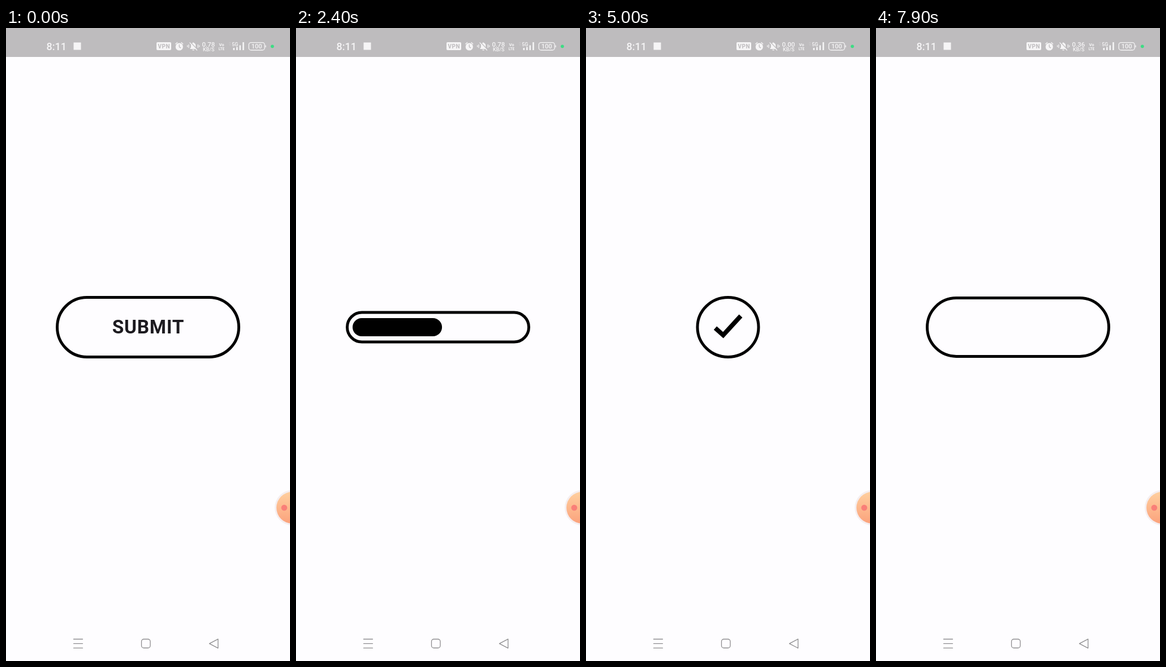
These frames come from a looping animation (502x1115 px, 8 s). An HTML page:

```html
<!DOCTYPE html>
<html lang="en">
<head>
<meta charset="utf-8">
<title>Submit button</title>
<style>
  html, body { margin: 0; width: 100%; height: 100%; overflow: hidden; background: #fefdff; }
  svg { display: block; width: 100vw; height: 100vh; font-family: Roboto, "Open Sans", sans-serif; }
  text { text-anchor: middle; }
  .status { fill: #f6f5f6; font-weight: 500; }
  .line { fill: none; stroke: #f6f5f6; stroke-width: 1.3; stroke-linecap: round; stroke-linejoin: round; }
  .cut { fill: none; stroke: #bebcbe; stroke-width: 1.3; stroke-linecap: round; }
  .nav { fill: none; stroke: #8d8c8e; stroke-width: 1.3; stroke-linecap: round; stroke-linejoin: round; }

  .pill, .bar, .check, .label, .rate, .arrows { animation: 8s linear infinite; }
  .pill { animation-name: morph; }
  .frame { fill: none; stroke: #000; stroke-width: 5; }
  .bar { x: 100px; animation-name: fill, squash; }
  .label { font-size: 33.4px; font-weight: 700; letter-spacing: .7px; fill: #1d1b20; animation-name: label; }
  .check { fill: none; stroke: #000; stroke-width: 8; stroke-dasharray: 1 2; animation-name: draw; }
  .rate { animation-timing-function: step-end; }
  .r1 { animation-name: rate1; }
  .r2 { animation-name: rate2; }
  .r3 { animation-name: rate3; }
  .arrows { animation-name: arrows; }

  /* wide pill, slim track, circle, wide pill again */
  @keyframes morph {
    0% { x: 90.5px; y: 474.5px; width: 321px; height: 105px; rx: 52.5px; ry: 52.5px; }
    13.79% { x: 90.5px; y: 474.5px; width: 321px; height: 105px; rx: 52.5px; ry: 52.5px;
      animation-timing-function: cubic-bezier(.4, 0, .2, 1); }
    23.79% { x: 90.5px; y: 501px; width: 321px; height: 52px; rx: 26px; ry: 26px; }
    42.26% { x: 90.5px; y: 501px; width: 321px; height: 52px; rx: 26px; ry: 26px;
      animation-timing-function: cubic-bezier(.4, 0, .2, 1); }
    52.26% { x: 197px; y: 474.5px; width: 108px; height: 105px; rx: 54px; ry: 52.5px; }
    74.6% { x: 197px; y: 474.5px; width: 108px; height: 105px; rx: 54px; ry: 52.5px;
      animation-timing-function: cubic-bezier(.4, 0, .2, 1); }
    84.6% { x: 90.5px; y: 474.5px; width: 321px; height: 105px; rx: 52.5px; ry: 52.5px; }
    97.54% { x: 90.5px; y: 474.5px; width: 321px; height: 105px; rx: 52.5px; ry: 52.5px;
      animation-timing-function: cubic-bezier(.504, 0, .772, .42); }
    100% { x: 90.5px; y: 480.6px; width: 321px; height: 92.8px; rx: 46.4px; ry: 46.4px; }
  }
  /* the bar keeps a fixed padding inside the track */
  @keyframes squash {
    0%, 13.79% { y: 484.5px; height: 85px; rx: 42.5px; ry: 42.5px;
      animation-timing-function: cubic-bezier(.4, 0, .2, 1); }
    23.79%, 100% { y: 511px; height: 32px; rx: 16px; ry: 16px; }
  }
  @keyframes fill {
    0% { width: 0; }
    18.71% { width: 0; animation-timing-function: cubic-bezier(.4, 0, .2, 1); }
    37.46% { width: 180px; animation-timing-function: cubic-bezier(.4, 0, .2, 1); }
    42.25% { width: 302px; animation-timing-function: step-end; }
    42.26%, 100% { width: 0; }
  }
  @keyframes draw {
    0% { stroke-dashoffset: 1; }
    47.5% { stroke-dashoffset: 1; animation-timing-function: cubic-bezier(.4, 0, .2, 1); }
    53.75% { stroke-dashoffset: 0; }
    74.6% { stroke-dashoffset: 0; animation-timing-function: step-end; }
    74.61%, 100% { stroke-dashoffset: 1; }
  }
  @keyframes label {
    0% { opacity: 1; animation-timing-function: step-end; }
    13.79% { opacity: 0; animation-timing-function: step-end; }
    74.6% { opacity: 1; animation-timing-function: step-end; }
    97.54%, 100% { opacity: 0; }
  }
  @keyframes rate1 { 0% { opacity: 1; } 38.75%, 100% { opacity: 0; } }
  @keyframes rate2 { 0% { opacity: 0; } 38.75% { opacity: 1; } 91.25%, 100% { opacity: 0; } }
  @keyframes rate3 { 0% { opacity: 0; } 91.25%, 100% { opacity: 1; } }
  @keyframes arrows {
    0% { opacity: .15; animation-timing-function: step-end; }
    78.75% { opacity: 1; animation-timing-function: step-end; }
    92.5%, 100% { opacity: .15; }
  }
</style>
</head>
<body>
<svg viewBox="0 0 502 1115" preserveAspectRatio="none">
  <defs>
    <linearGradient id="peach" x1="0" y1="0" x2="0" y2="1">
      <stop offset="0" stop-color="#ffd0a0"/>
      <stop offset="1" stop-color="#fba27c"/>
    </linearGradient>
    <clipPath id="inside"><rect class="pill"/></clipPath>
  </defs>

  <rect width="502" height="1115" fill="#fefdff"/>
  <rect width="502" height="51" fill="#bebcbe"/>

  <g class="status">
    <text x="89.3" y="38.5" font-size="18">8:11</text>
    <rect x="119.5" y="25.5" width="13" height="13"/>

    <rect x="266" y="25" width="26" height="14" rx="2"/>
    <text x="279.2" y="35.8" font-size="10" font-weight="700" letter-spacing=".5" fill="#bebcbe">VPN</text>

    <circle cx="306.3" cy="33" r="6.6"/>
    <path class="line" d="M299.8 28l3-2.6M312.8 28l-3-2.6"/>
    <path class="cut" d="M306.3 29.3v4l2.4 1.6"/>

    <path d="M325.5 37v-1.2l1.4-1.5v-3.6c0-2.400 1.500-4 3.300-4.500v-.8h1.800v.8c1.800.5 3.300 2.100 3.300 4.500v3.600l1.400 1.500v1.200zM329.300 38h3.600a1.800 1.600 0 0 1-3.600 0z"/>
    <path class="cut" d="M326.500 25.500l12 12.500"/>
    <path class="line" d="M325 26l12.500 13M323 29.500v5M320.600 31v2M339.300 29.500v5M341.700 31v2"/>

    <g font-size="11.500">
      <text class="rate r1" x="358" y="33">0.78</text>
      <text class="rate r2" x="358" y="33">0.00</text>
      <text class="rate r3" x="358" y="33">0.36</text>
    </g>
    <text x="358.300" y="41" font-size="9">KB/S</text>

    <g font-size="6.500" font-weight="700">
      <text x="381" y="31.500" font-size="7.500">Vo</text>
      <text x="381" y="39">LTE</text>
    </g>

    <path class="arrows" d="M393.500 27l2.300-2.800 2.300 2.800zM393.500 28.500l2.300 2.800 2.300-2.800z"/>
    <text x="404.800" y="31.500" font-size="8.800">5G</text>
    <path d="M401.500 35h2.600v4h-2.600zM407 33.500h2.600v5.500h-2.600zM412.500 30.500h2.600v8.500h-2.600zM418.200 25h2.600v14h-2.600z"/>

    <rect class="line" x="429.200" y="25.600" width="28" height="13.400" rx="4"/>
    <path class="line" d="M459 31v2.500"/>
    <text x="443.200" y="36.300" font-size="11">100</text>
    <circle cx="470.800" cy="32.300" r="2.900" fill="#3ddc84"/>
  </g>

  <g clip-path="url(#inside)">
    <text class="label" x="251.400" y="538">SUBMIT</text>
  </g>
  <rect class="bar"/>
  <path class="check" pathLength="1" d="M228.500 528.500L242.500 541L273.500 507.300"/>
  <rect class="pill frame"/>

  <circle cx="506" cy="845" r="31" fill="#f5eef0"/>
  <circle cx="506" cy="845" r="28" fill="url(#peach)"/>
  <circle cx="491.800" cy="845" r="5.300" fill="#f97f78"/>

  <path class="nav" d="M119.500 1076.500h16M119.500 1084.300h16M119.500 1092.200h16"/>
  <rect class="nav" x="239.500" y="1076.500" width="15.500" height="15.500" rx="4"/>
  <path class="nav" d="M359.500 1084.300L374.800 1076.300V1092.300Z"/>
</svg>
</body>
</html>
```
